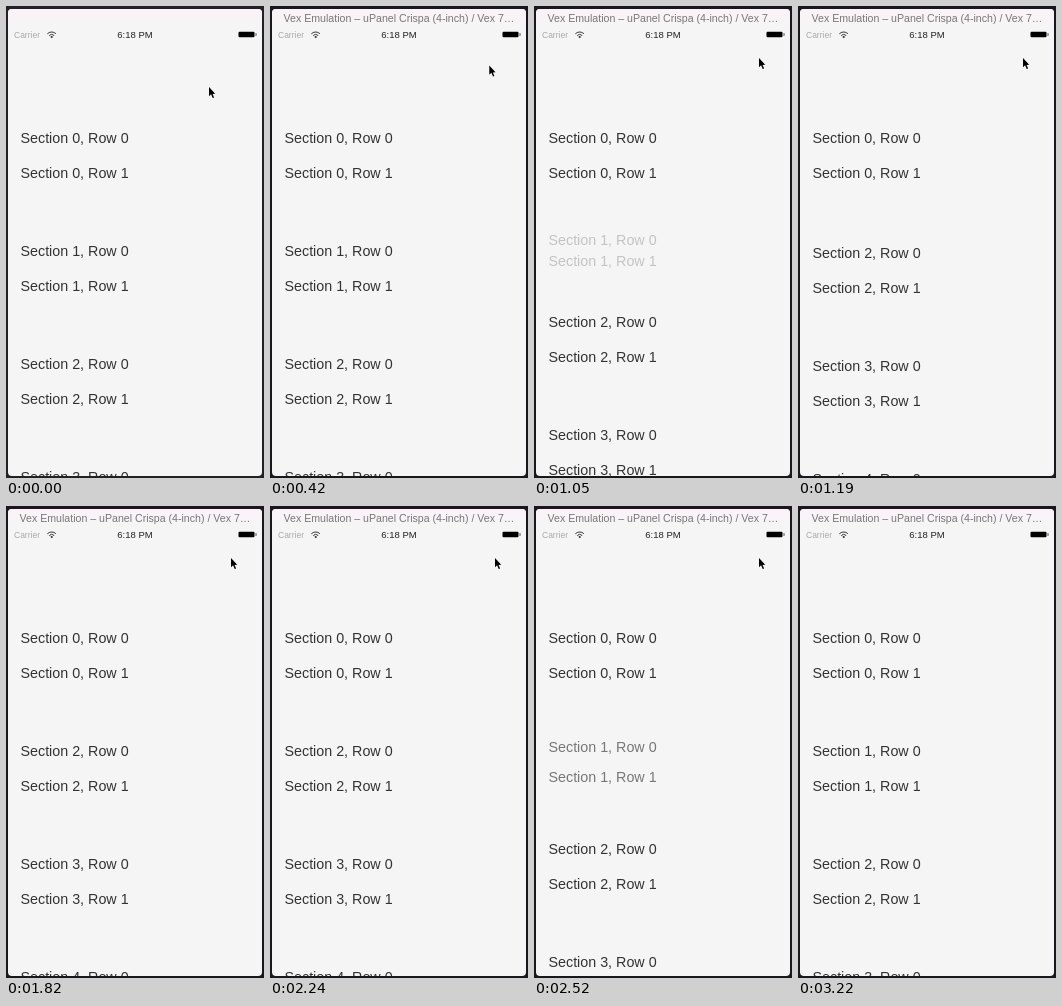
These frames come from a looping animation (258 px wide and 472 px high, 3850 ms). An HTML page with a canvas:

```html
<!DOCTYPE html>
<html lang="en">
<head>
<meta charset="utf-8">
<style>
  html, body { margin: 0; width: 100%; height: 100%; overflow: hidden; background: #1b191d; }
  canvas { display: block; width: 258px; height: 472px; }
</style>
</head>
<body>
<canvas id="stage"></canvas>
<script>
const W = 258, H = 472, LOOP = 3850, STEP = 70;
const SECTION = 113, ROW = 35, FIRST = 137;
const SLIDE = 275;
const SANS = '"Liberation Sans", Arial, sans-serif';

const canvas = document.getElementById('stage');
const dpr = window.devicePixelRatio || 1;
canvas.width = W * dpr;
canvas.height = H * dpr;
const ctx = canvas.getContext('2d');
ctx.scale(dpr, dpr);

const progress = (t, start, length) => Math.min(1, Math.max(0, (t - start) / length));
const smooth = p => p * p * (3 - 2 * p);

function text(str, x, y, size, color, align = 'left') {
  ctx.font = `${size}px ${SANS}`;
  ctx.fillStyle = color;
  ctx.textAlign = align;
  ctx.fillText(str, x, y);
}

function panel(x, y, w, h, r, color) {
  ctx.beginPath();
  ctx.roundRect(x, y, w, h, r);
  ctx.fillStyle = color;
  ctx.fill();
}

function drawWindow(active) {
  ctx.fillStyle = active ? '#19171b' : '#232126';
  ctx.fillRect(0, 0, W, H);
  panel(2, 3, 254, 467, 4, '#f5f5f5');
  const bar = ctx.createLinearGradient(0, 3, 0, 19);
  bar.addColorStop(0, '#fcf2f8');
  bar.addColorStop(1, '#f5f5f5');
  panel(2, 3, 254, 16, [4, 4, 0, 0], bar);
  if (active) {
    text('Vex Emulation – uPanel Crispa (4-inch) / Vex 7…', 129, 16, 10.6, '#777', 'center');
  }
}

function drawStatus() {
  text('Carrier', 8, 32, 8.5, '#aaa');
  text('6:18 PM', 129, 32, 9.5, '#222', 'center');

  ctx.strokeStyle = '#333';
  ctx.lineWidth = 1;
  for (const r of [3.5, 6]) {
    ctx.beginPath();
    ctx.arc(45.7, 32, r, -Math.PI * 0.76, -Math.PI * 0.24);
    ctx.stroke();
  }
  ctx.beginPath();
  ctx.arc(45.7, 31, 1.1, 0, Math.PI * 2);
  ctx.fillStyle = '#333';
  ctx.fill();

  panel(232.5, 25.8, 16, 5.4, 1, '#000');
  panel(249.5, 27, 1, 3, 0.5, '#555');
}

// open: 1 when section 1 is in the list, 0 when it is removed
function drawList(open) {
  const shut = 1 - open;
  ctx.save();
  ctx.beginPath();
  ctx.rect(2, 40, 254, 430);
  ctx.clip();
  for (let s = 0; s < 5; s++) {
    for (let r = 0; r < 2; r++) {
      let y = FIRST + s * SECTION + r * ROW;
      ctx.globalAlpha = 1;
      if (s === 1) {
        y -= shut * (r ? 67 : 30);
        ctx.globalAlpha = open ** 3;
      } else if (s > 1) {
        y -= shut * SECTION;
      }
      text(`Section ${s}, Row ${r}`, 14.5, Math.round(y), 14.3, '#333');
    }
  }
  ctx.restore();
}

function drawPointer(x, y) {
  const shape = [[0, 0], [0, 9.2], [2.1, 7.3], [3.7, 11], [5.1, 10.4], [3.6, 6.9], [6.2, 6.7]];
  ctx.beginPath();
  for (const [dx, dy] of shape) ctx.lineTo(x + dx, y + dy);
  ctx.closePath();
  ctx.fillStyle = '#000';
  ctx.fill();
}

function drawRing() {
  ctx.beginPath();
  ctx.arc(224.7, 52, 16.3, 0, Math.PI * 2);
  ctx.strokeStyle = '#000';
  ctx.lineWidth = 2;
  ctx.stroke();
}

function draw(t) {
  const open = t < 1600
    ? 1 - smooth(progress(t, 937, SLIDE))
    : smooth(progress(t, 2308.5, SLIDE));
  drawWindow(t >= 210);
  drawStatus();
  drawList(open);

  const pressed = (t >= 840 && t < 910) || (t >= 1960 && t < 2240);
  if (pressed) drawRing();

  if (t < 2940) {
    const p = smooth(progress(t, 140, 420));
    drawPointer(203 + 22 * p, 81 - 29 * p);
  } else if (t < 3010) {
    drawPointer(231, 51);
  }
}

const began = performance.now();
function tick() {
  const t = (performance.now() - began) % LOOP;
  draw(Math.floor(t / STEP) * STEP);
  requestAnimationFrame(tick);
}
tick();
</script>
</body>
</html>
```
